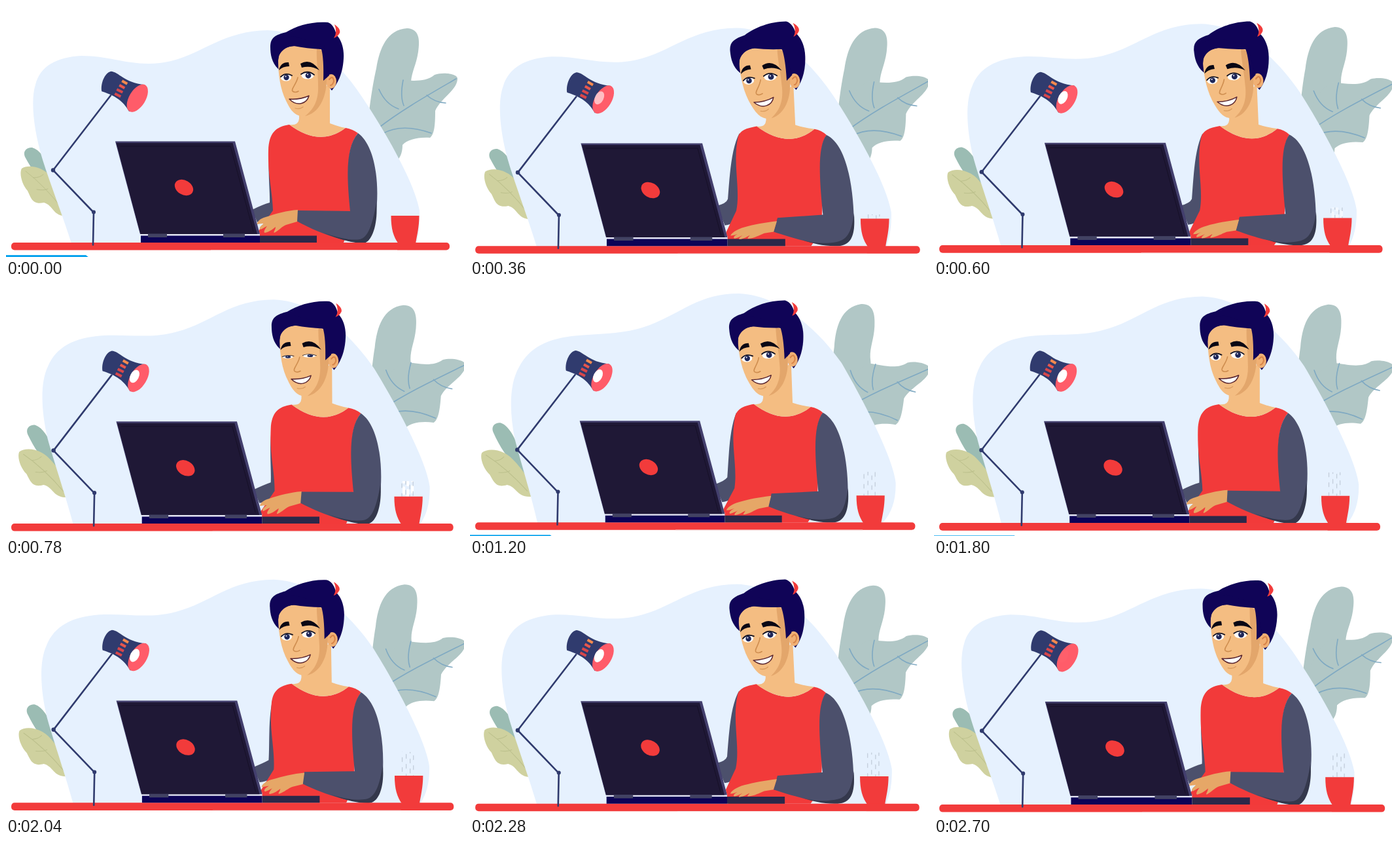
These frames come from a looping animation (700 px wide and 383 px high, 2.76 s). An HTML page:

```html
<!DOCTYPE html>
<html lang="en">
<head>
<meta charset="utf-8">
<title>Working at the desk</title>
<style>
  html, body { margin: 0; width: 100%; height: 100%; overflow: hidden; background: #fff; }
  svg { display: block; width: 100%; height: 100%; }
  .line { fill: none; stroke-linecap: round; stroke-linejoin: round; }
  .vein { fill: none; stroke: #7fa9c2; stroke-width: 1.6; stroke-linecap: round; }
</style>
</head>
<body>
<svg viewBox="0 0 700 383">
  <clipPath id="steamClip"><rect id="steamBox" x="590" width="45"/></clipPath>
  <g id="scene">
    <path d="M0,380H122L127,384H0Z" fill="#0ea5ee"/>

    <g id="leafTop">
      <path fill="#b1c7c6" d="M550,215C552,180 558,130 566,95C571,65 582,36 613,34C631,35 633,50 630,70C627,90 620,100 619,116C620,160 605,190 550,215Z"/>
    </g>
    <g id="leafSide">
      <path fill="#b1c7c6" d="M550,210C560,160 575,122 598,113C616,113 640,118 655,105C670,100 692,104 690,112C688,130 665,140 656,160C656,180 655,196 648,201C628,200 614,204 606,212C606,225 602,232 596,238Z"/>
      <path class="vein" d="M568,187C604,159 645,136 688,111M600,157Q580,150 570,127M608,152Q602,138 607,113M643,136Q655,147 672,148M575,195Q605,178 650,194"/>
    </g>
    <g id="leafTeal">
      <path fill="#9bbcb3" d="M110,310C70,290 45,260 30,232C24,222 32,215 40,216C54,220 66,240 80,275Z"/>
    </g>
    <g id="leafLime">
      <path fill="#cfd19f" d="M103,320C70,325 75,305 58,300C40,304 38,292 33,282C24,272 20,255 24,248C34,241 57,245 70,262C85,280 95,300 103,320Z"/>
      <path class="line" stroke="#bcc08c" d="M30,252Q60,275 88,312M42,262Q52,262 57,257M47,280Q58,282 64,279"/>
    </g>

    <path id="blob" fill="#e6f1fe"/>

    <g clip-path="url(#steamClip)" class="line">
      <path id="puff" stroke="#fff" stroke-width="4" stroke-dasharray="9 8" d="M603,322V280M609,326V280M616,320V280"/>
      <path id="steam" stroke="#c3cedb" stroke-width="1.3" stroke-dasharray="6 9" d="M600,330V280M606,325V280M612,332V280M617,327V280"/>
    </g>
    <path fill="#f23b3b" d="M588.500,320H631.500C631.500,338 628,350 626,363H600C592,352 588.500,340 588.500,320Z"/>

    <path id="armBack" fill="#4c506c"/>
    <path id="shirt" fill="#f23a3a"/>
    <path id="neck" fill="#f4bd82"/>

    <g id="head">
      <path fill="#100457" d="M416,96C406,86 404,74 404,62C404,48 412,44 428,40C444,30 468,23 492,25C500,28 503,36 505,44C513,52 517,66 516,80C515,100 509,116 498,129L484,110Z"/>
      <ellipse cx="497" cy="115" rx="8" ry="11" fill="#f0b074"/>
      <path class="line" stroke="#d8854a" stroke-width="2" d="M494,112Q500,105 501,115Q499,121 496,121"/>
      <path fill="#f4bd82" d="M416,82C418,66 428,61 445,61Q472,62 484,67L490,112C490,140 478,164 457,168C440,170 433,156 425,138C417,118 416,95 416,82Z"/>
      <path fill="#e3a66b" d="M485,70L490,112C490,140 478,164 457,168C473,156 478,140 477,120C477,100 474,80 475,64Z"/>
      <path fill="#100457" d="M405,64C402,56 415,50 440,46L486,60Q489,85 494,106L485,114Q486,80 482,66Q460,65 440,61Q424,62 417,76L415,90Q406,82 405,64Z"/>
      <path fill="#f23b3b" d="M502,28Q512,35 510,41Q507,47 501,49Q507,40 502,28Z"/>
      <g id="eyes">
        <ellipse cx="428" cy="109" rx="8" ry="5.500" fill="#fff"/>
        <ellipse cx="461" cy="106" rx="9.500" ry="5.500" fill="#fff"/>
        <circle cx="428.500" cy="109" r="4.200" fill="#1f2759"/>
        <circle cx="462" cy="106" r="4.400" fill="#1f2759"/>
        <circle cx="427.500" cy="107.500" r="1" fill="#fff"/>
        <circle cx="461" cy="104.500" r="1" fill="#fff"/>
        <path class="line" stroke="#111020" stroke-width="1.800" d="M420,108Q427,101 437,106M451,104Q461,97 471,105"/>
      </g>
      <path fill="#090714" d="M417,98Q420,85 432,86L433,92Q423,92 417,98ZM450,88Q466,79 479,98Q466,90 452,94Z"/>
      <path class="line" stroke="#cf8e50" stroke-width="1.600" d="M446,109C444,119 435,127 438,130Q442,133 447,130"/>
      <path fill="#fff" stroke="#5b2730" stroke-width="1.500" stroke-linejoin="round" d="M433,142Q450,143 463,137C460,148 446,155 433,142Z"/>
      <path class="line" stroke="#d99b5e" stroke-width="1.300" d="M442,156Q449,158 454,154"/>
    </g>

    <path id="sleeve" fill="#4c506c"/>
    <path id="shade" fill="#34384c"/>

    <rect x="8" y="361" width="670" height="11.500" rx="5" fill="#f23b3b"/>
    <path d="M313,372.800H598" stroke="#f5dede"/>

    <path d="M205,346H388V351H206Z" fill="#e4e6f3"/>
    <path d="M206,350.500H388V361H206Z" fill="#0c0356"/>
    <path d="M388,350.500H475V361H388Z" fill="#2b2849"/>
    <path d="M167,206.500H350L388,348H205Z" fill="#433f6d"/>
    <path d="M168.500,209H346.500L384,348H205.500Z" fill="#1f1836"/>
    <path class="line" stroke="#171128" d="M175,214H343L378,344"/>
    <path d="M217,347.500H246V353H217ZM332,347.500H365V353H332Z" fill="#424263"/>
    <ellipse cx="272" cy="277" rx="15" ry="11" transform="rotate(30 272 277)" fill="#f23b3b"/>

    <path id="hand" fill="#e6a767"/>

    <g fill="#303b6e">
      <path class="line" stroke="#303b6e" stroke-width="2.600" d="M133,364.500L134,315L72,250.500L160,136.500"/>
      <circle cx="72" cy="250.500" r="3.200"/>
      <circle cx="134" cy="314.500" r="3"/>
    </g>
    <g transform="translate(.3 -.8)">
      <path fill="#303b6e" d="M146,131C144,120 150,103 160,100.500C172,101 180,118 212,121L188,162C181,150 172,139 146,131Z"/>
      <ellipse cx="200.500" cy="141.500" rx="12.500" ry="23.500" transform="rotate(31 200.500 141.500)" fill="#ff5c69"/>
      <ellipse id="bulb" cx="194.500" cy="139" rx="6.500" ry="10.500" transform="rotate(27 194.500 139)" fill="#fff"/>
      <g class="line" stroke-width="4" style="stroke-linecap:butt">
        <path stroke="#f58a4e" d="M177,115L185,119.500"/>
        <path stroke="#e9574c" d="M173,121.500L181,126"/>
        <path stroke="#d9474a" d="M169,128L178,132.500M166,134.500L175,139"/>
      </g>
    </g>
  </g>
</svg>
<script>
const LOOP = 2760, STEP = 60, SWAY = LOOP / 3;
const el = id => document.getElementById(id);

// Pairs of poses with matching path commands.
const blob = [
  'M100,362C85,315 65,265 54,228C43,190 37,145 45,120C52,92 77,78 115,76C160,76 190,92 235,87C295,80 325,38 400,37C455,38 505,80 545,140C585,200 624,270 632,312Q633,340 627,362Z',
  'M103,362C95,325 78,270 69,235C61,195 60,152 76,125C92,95 120,81 165,77C205,73 235,75 275,60C325,40 350,12 410,12C470,14 530,65 567,118C600,175 645,262 649,300Q650,340 628,362Z'
];
const poses = {
  armBack: [
    'M405,202C398,240 404,280 403,300Q392,303 376,311L384,330Q402,328 410,318L415,240Z',
    'M406,191C394,212 391,250 388,290Q386,297 372,300L384,330Q402,328 408,310L415,230Z'
  ],
  shirt: [
    'M433,181C412,184 402,194 401,220C400,262 407,280 408,312L386,343L390,361L516,361C530,330 526,300 524,270C521,225 529,205 538,194Q530,188 519,186Q480,216 433,181Z',
    'M432,181C416,184 407,187 404,196C395,235 408,275 401,308L386,340L390,361L514,361C535,335 531,300 530,270C527,225 529,208 537,194Q530,187 519,185Q480,217 432,181Z'
  ],
  neck: [
    'M448,155L495,118L495,179Q508,184 519,186Q480,216 433,181Q447,183 448,172Z',
    'M446,155L487,118L490,179Q506,184 519,185Q480,217 432,181Q445,183 446,172Z'
  ],
  sleeve: [
    'M538,194C520,215 520,255 526,313L445,312L444,328C475,345 510,358 540,361C556,362 560,345 565,320C571,280 567,215 538,194Z',
    'M537,194C524,212 526,255 532,314L464,319L458,340C480,347 510,357 545,360C567,361 577,355 579,330C579,290 572,210 537,194Z'
  ],
  shade: [
    'M485,346C510,355 530,358 541,356C553,353 560,335 566,300C569,330 560,362 545,362C525,362 500,352 485,346Z',
    'M500,352C520,358 540,358 556,354C570,350 576,338 579,312C581,340 578,360 555,361C535,362 515,357 500,352Z'
  ],
  hand: [
    'M446,311C430,312 412,317 397,322C388,324 383,330 384,333C388,332 391,332 394,332C388,336 386,340 389,341C392,340 396,337 399,336C395,341 393,346 396,346C404,344 408,340 412,337C412,342 408,345 410,346C418,342 422,336 428,334L445,329Z',
    'M463,324C446,326 428,329 414,333C402,336 393,343 393,346C398,346 402,344 406,342C399,345 396,349 399,350C403,349 408,347 411,345C407,348 404,351 407,351C414,350 418,347 422,345C420,348 417,350 420,350C430,349 436,345 444,342L458,340Z'
  ]
};

function mix([a, b], k) {
  const ends = b.match(/[\d.]+/g);
  let i = 0;
  return a.replace(/[\d.]+/g, n => (+n + (ends[i++] - n) * k).toFixed(2));
}
const wave = (t, period) => (1 - Math.cos(2 * Math.PI * t / period)) / 2;
const clamp = v => Math.max(0, Math.min(1, v));
const set = (id, name, value) => el(id).setAttribute(name, value);
const turn = (id, deg, x, y) => set(id, 'transform', `rotate(${deg} ${x} ${y})`);

function draw(t) {
  const drift = wave(t, LOOP);
  const swing = wave(t, SWAY);
  const lean = swing * swing * (3 - 2 * swing);

  // The zoom snaps back on the first step of the loop.
  set('scene', 'transform', `scale(${t ? 1.0165 - .0135 * drift : 1})`);
  set('blob', 'd', mix(blob, drift));
  turn('leafTop', -5.7 * drift, 550, 212);
  turn('leafSide', 7 * drift, 550, 208);
  turn('leafTeal', 4.6 * drift, 125, 305);
  turn('leafLime', -5.2 * drift, 103, 320);

  for (const id in poses) set(id, 'd', mix(poses[id], lean));
  set('head', 'transform', `translate(${-2.5 * lean} 0) rotate(${-5.2 * lean} 465 175)`);
  const lid = 1 - .55 * clamp(1 - Math.abs(t - 780) / 120);
  set('eyes', 'transform', `translate(0 ${108 * (1 - lid)}) scale(1 ${lid})`);

  set('bulb', 'opacity', clamp(drift * 3.8));
  const rise = 36 * clamp((t - 200) / 900);
  set('steamBox', 'y', 320 - rise);
  set('steamBox', 'height', rise);
  set('steam', 'stroke-dashoffset', -t * .03);
  set('puff', 'stroke-dashoffset', -t * .03);
  set('puff', 'opacity', clamp(1 - Math.abs(t - 780) / 400));
}

function tick(now) {
  draw(Math.floor(now % LOOP / STEP) * STEP);
  requestAnimationFrame(tick);
}
draw(0);
requestAnimationFrame(tick);
</script>
</body>
</html>
```
